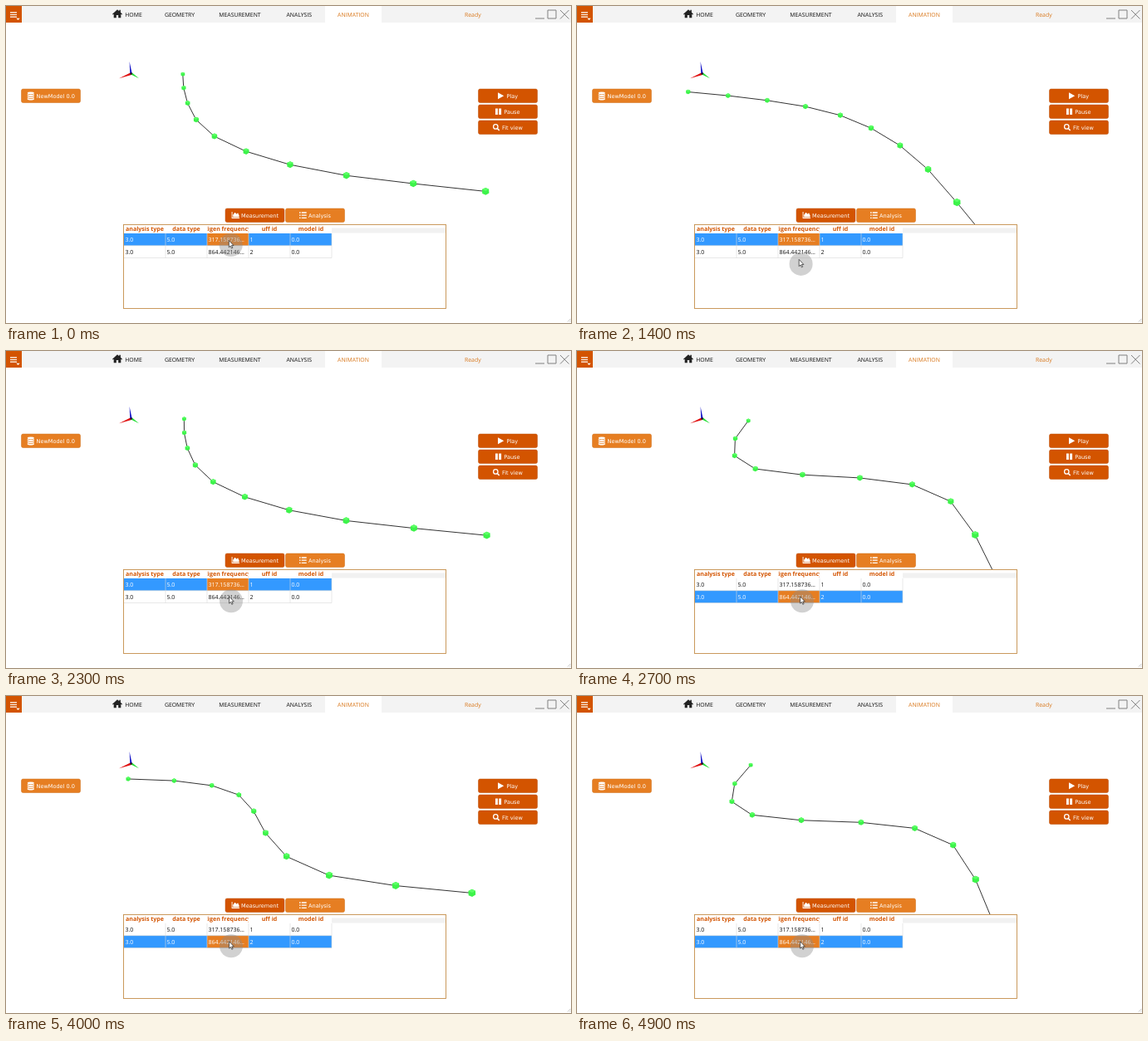
Animation, 680 px wide and 382 px high, one loop 5000 ms. Source, as an HTML page:

```html
<!DOCTYPE html>
<html lang="en">
<head>
<meta charset="utf-8">
<title>Mode shape animation</title>
<style>
  html, body { margin: 0; width: 100%; height: 100%; overflow: hidden; background: #fff; }
  svg { display: block; width: 680px; height: 382px; }
  text { font: 6.9px "Open Sans", "Noto Sans", sans-serif; fill: #111; text-rendering: geometricPrecision; white-space: pre; }
  .mid { text-anchor: middle; }
  .btn text { font: 6.55px "DejaVu Sans", sans-serif; fill: #fff; }
  .dark { fill: #d35400; }
  .light { fill: #e67e22; }
  .btn > rect.dark { stroke: #b94a00; stroke-width: .5; }
  .btn > rect.light { stroke: #cf6c17; stroke-width: .5; }
  .hot { fill: #d9781c; }
  .head text { font-weight: 700; font-size: 7.05px; fill: #d35400; text-anchor: middle; }
  .icon { fill: #fff; }
  .row text { font-size: 7px; }
  .row .bar, .row .cell { display: none; }
  .row.on .bar { display: block; fill: #3399ff; }
  .row.on .cell { display: block; fill: #e67e22; }
  .row.on text { fill: #fff; }
  .grid { fill: none; stroke: #d8d8d8; stroke-width: .6; }
  .win { fill: none; stroke: #808080; stroke-width: 1; }
</style>
</head>
<body>
<svg viewBox="0 0 680 382" xmlns="http://www.w3.org/2000/svg">
  <defs>
    <clipPath id="view"><rect y="20" width="680" height="243"/></clipPath>
    <clipPath id="col"><rect x="242.3" y="263" width="49.4" height="12"/></clipPath>
  </defs>
  <rect width="680" height="382" fill="#fff"/>

  <!-- menu bar -->
  <rect width="680" height="20" fill="#f3f3f3"/>
  <rect x="384" width="68" height="20" fill="#fff"/>
  <rect width="19" height="20" class="dark"/>
  <path d="M5 7.8h8M5 10.5h8M5 13.2h8" stroke="#fff" stroke-width="1.2"/>
  <path d="M12.3 14.8h4.4l-2.2 2.3z" fill="#fff"/>
  <path d="M128 9.7 134 4.2l2.3 2.1V4.8h1.6v3l2.1 1.9-.8.8-.9-.8v4.6h-3.1v-3.2h-2.4v3.2h-3.1V9.7l-.9.8z" fill="#222"/>
  <g class="mid">
    <text x="153.5" y="12.8">HOME</text>
    <text x="209" y="12.8">GEOMETRY</text>
    <text x="281.5" y="12.8">MEASUREMENT</text>
    <text x="352.8" y="12.8">ANALYSIS</text>
    <text x="418" y="12.8" class="hot">ANIMATION</text>
    <text x="561.8" y="12.8" class="hot">Ready</text>
  </g>
  <path class="win" d="M637 15h11M652 5h10v10h-10zM667 5l10.500 10.500M677.500 5 667 15.500"/>
  <path d="M676 380.500l3.500-3.500M678.500 380.500l1-1" stroke="#b5b5b5" stroke-width=".8"/>

  <!-- axis triad -->
  <path d="M136 87.300 150.500 80l1.300 2.800z" fill="#e01010"/>
  <path d="M160 87.200 149.800 82.300l1.800-2z" fill="#22dd33"/>
  <path d="M148.600 67 149.300 81.500l2.300-.6z" fill="#1414c8"/>
  <circle cx="150.600" cy="81.500" r="1.300" fill="#301030"/>

  <g clip-path="url(#view)">
    <polyline id="beam" fill="none" stroke="#1c1c1c" stroke-width=".9"/>
    <g id="nodes"></g>
  </g>

  <!-- buttons -->
  <g class="btn">
    <rect x="18.500" y="100" width="71" height="16.500" rx="2" class="light"/>
    <g class="icon">
      <ellipse cx="29.800" cy="105" rx="4" ry="1.400"/>
      <path id="disc" d="M25.800 106c1 1.300 7 1.300 8 0v1.700c-1 1.300-7 1.300-8 0z"/>
      <use href="#disc" y="2.400"/><use href="#disc" y="4.700"/>
    </g>
    <text x="36.500" y="110.500">NewModel 0.0</text>

    <rect x="568.500" y="100" width="71" height="16.500" rx="2" class="dark"/>
    <path d="M592 104.200v8l7.200-4z" class="icon"/>
    <text x="602.500" y="110.500">Play</text>

    <rect x="568.500" y="119" width="71" height="16.500" rx="2" class="dark"/>
    <path d="M589 123.500h2.900v7.400h-2.900zM593.200 123.500h2.900v7.400h-2.900z" class="icon"/>
    <text x="599.300" y="129.600">Pause</text>

    <rect x="568.500" y="138" width="71" height="16.500" rx="2" class="dark"/>
    <circle cx="589.300" cy="145.400" r="2.700" fill="none" stroke="#fff" stroke-width="1.300"/>
    <path d="M591.300 147.500l2.400 2.500" stroke="#fff" stroke-width="1.600"/>
    <text x="597" y="148.600">Fit view</text>

    <rect x="264" y="244" width="71" height="16.500" rx="2" class="dark"/>
    <path d="M271.600 248v8h9.400v-.9h-8.500V248zM273.200 254.500v-2.800l2.300-3 2 2 1.600-1.400 1.500 3.200v2z" class="icon"/>
    <text x="283" y="254.600">Measurement</text>

    <rect x="336.500" y="244" width="71" height="16.500" rx="2" class="light"/>
    <path d="M353 249h1.600M353 252.200h1.600M353 255.400h1.600M355.700 249h6M355.700 252.200h6M355.700 255.400h6" stroke="#fff" stroke-width="1.300"/>
    <text x="364" y="254.600">Analysis</text>
  </g>

  <!-- table -->
  <rect x="141.500" y="263.500" width="388" height="101" fill="#fff" stroke="#c58f4c" stroke-width=".9"/>
  <rect x="392" y="267.500" width="137" height="6" fill="#f1f1f1"/>
  <g class="head">
    <text x="167" y="271.300">analysis type</text>
    <text x="217" y="271.300">data type</text>
    <g clip-path="url(#col)"><text x="267" y="271.300">Eigen frequency</text></g>
    <text x="317" y="271.300">uff id</text>
    <text x="367" y="271.300">model id</text>
  </g>
  <g id="rows"></g>
  <path class="grid" d="M142 288.700h250M142 303.500h250M192 274v29.500M242 274v29.500M292 274v29.500M342 274v29.500M392 274v29.500"/>

  <!-- pointer -->
  <g id="pointer">
    <circle cx="2.400" cy="5.500" r="14" fill="#8c8c8c" fill-opacity=".4"/>
    <path d="M0 0v8.300l1.900-1.700 1.300 2.900 1.300-.6-1.300-2.800h2.500z" fill="#fff" stroke="#222" stroke-width=".7"/>
  </g>
</svg>
<script>
const NS = "http://www.w3.org/2000/svg";
const $ = id => document.getElementById(id);
const add = (parent, tag, attrs, label = "") => {
  const el = document.createElementNS(NS, tag);
  for (const k in attrs) el.setAttribute(k, attrs[k]);
  el.textContent = label;
  parent.append(el);
  return el;
};

const LOOP = 5000, STEP = 100, CLICK = 2500;

// Out-of-plane shapes at the ten stations of the beam
const modes = [
  [.0513, .0204, -.0064, -.0281, -.0397, -.0388, -.0281, -.0078, .0207, .0510],
  [.0462, -.0090, -.0426, -.0474, -.0193, .0203, .0480, .0449, .0077, -.0402]
];
// Vanishing point of the displacement direction
const far = { x: 984, y: -125 };

// Pointer tip: time, x, y
const path = [[0, 268.3, 282.500], [600, 266, 298], [800, 266, 298.300],
              [1200, 267, 306.500], [1300, 267, 306.500], [1800, 268.600, 295.800], [LOOP, 268.600, 295.800]];

const cells = [["3.0", "5.0", "317.158736...", "1", "0.0"],
               ["3.0", "5.0", "864.442146...", "2", "0.0"]];
const rows = cells.map((vals, r) => {
  const top = 274 + r * 14.800, g = add($("rows"), "g", { class: "row" });
  add(g, "rect", { class: "bar", x: 142, y: top, width: 250, height: 14.800 });
  add(g, "rect", { class: "cell", x: 242, y: top, width: 50, height: 14.800 });
  vals.forEach((v, c) => add(g, "text", { x: 143.500 + c * 50, y: top + 9.900 }, v));
  return g;
});

const nodes = modes[0].map(() => {
  const g = add($("nodes"), "g", {});
  add(g, "path", { d: "M-.9-.55 .05-1 .95-.6 1 .45 .1 1-.85.6z", fill: "#3df34a" });
  add(g, "path", { d: "M-.9-.55 .05-1 .95-.6 .1-.1z", fill: "#5cff66" });
  return g;
});

// Perspective image of station s pushed out by u
function project(s, u) {
  const w = 1 - .04872 * s;
  const x = (173.2 + 14.447 * s) / w;
  const y = 92.9 + .442 * (x - 173.2);
  const e = u / (w + u);
  return { x: x + (far.x - x) * e, y: y + (far.y - y) * e, size: 2.700 / (w + u) };
}

function swing(t) {
  const cos = deg => Math.cos(deg * Math.PI / 180);
  return t < CLICK ? 1.125 * cos(27.3 + .135 * t) : 1.01 * cos(.156 * (t - 2540));
}

function pointerAt(t) {
  const i = path.findIndex(p => p[0] > t);
  const [t0, x0, y0] = path[i - 1], [t1, x1, y1] = path[i];
  const k = (t - t0) / (t1 - t0), e = k * k * (3 - 2 * k);
  return [x0 + (x1 - x0) * e, y0 + (y1 - y0) * e];
}

function draw(t) {
  const mode = t < CLICK ? 0 : 1, q = swing(t);
  const pts = modes[mode].map((m, s) => project(s, m * q));
  $("beam").setAttribute("points", pts.map(p => p.x.toFixed(2) + "," + p.y.toFixed(2)).join(" "));
  pts.forEach((p, i) => nodes[i].setAttribute("transform", `translate(${p.x} ${p.y}) scale(${p.size})`));
  rows.forEach((r, i) => r.classList.toggle("on", i === mode));
  $("pointer").setAttribute("transform", `translate(${pointerAt(t)})`);
}

const start = performance.now();
function tick(now) {
  const t = Math.max(0, now - start) % LOOP;
  draw(Math.floor(t / STEP) * STEP);
  requestAnimationFrame(tick);
}
draw(0);
requestAnimationFrame(tick);
</script>
</body>
</html>
```
